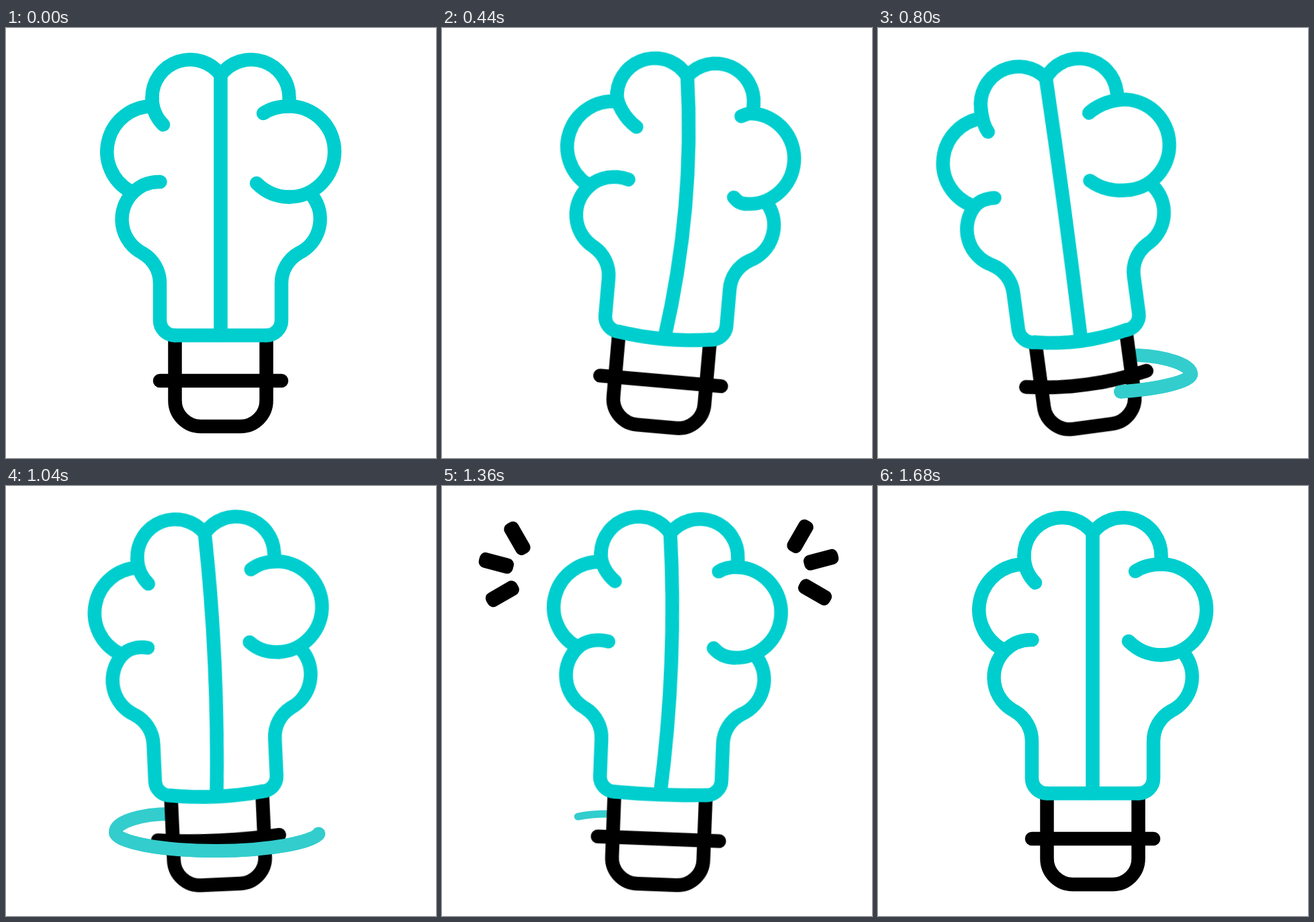
These frames come from a looping animation (640x640 px, 2.16 s). An HTML page without scripts:

```html
<!DOCTYPE html>
<html lang="en">
<head>
<meta charset="utf-8">
<title>Swaying idea bulb</title>
<style>
  html, body { margin: 0; width: 100%; height: 100%; overflow: hidden; background: #fff; }
  svg { display: block; width: 100vw; height: 100vh; }
  path { fill: none; stroke-linecap: round; stroke-linejoin: round; }
  .bulb { stroke: #00cece; stroke-width: 20.5; }
  .base { stroke: #000; stroke-width: 20.5; }

  /* Everything that sways shares one clock and one easing. */
  .sway, .sway path { animation: 2160ms cubic-bezier(.333, 0, .667, 1) infinite; }
  .sway { animation-name: sway; transform-origin: 319.5px 593px; }
  .sway .middle { animation-name: middle; }
  .sway .floor { animation-name: floor; }
  .sway .bar { animation-name: bar; }
  .sway .curl-a { animation-name: curl-a; }
  .sway .curl-b { animation-name: curl-b; }
  .sway .curl-c { animation-name: curl-c; }
  .sway .curl-d { animation-name: curl-d; }

  @keyframes sway {
    0%, 77.78%, 100% { transform: rotate(0deg); }
    20.37% { transform: rotate(5deg); }
    38.89% { transform: rotate(-8deg); }
    57.41% { transform: rotate(2.72deg); }
  }
  @keyframes middle {
    0%, 77.78%, 100% { d: path("M319.5 70Q319.5 262 319.5 457"); }
    20.37% { d: path("M319.5 70Q347.5 262 319.5 462"); }
    38.89% { d: path("M319.5 70Q321.5 262 319.5 464"); }
    57.41% { d: path("M319.5 70Q341.5 262 319.5 459"); }
  }
  @keyframes floor {
    0%, 77.78%, 100% { d: path("M251.5 457.5Q319.5 457.5 387.5 457.5"); }
    20.37% { d: path("M251.5 457.5Q319.5 467.5 387.5 457.5"); }
    38.89% { d: path("M251.5 457.5Q319.5 472 387.5 457.5"); }
    57.41% { d: path("M251.5 457.5Q319.5 462 387.5 457.5"); }
  }
  @keyframes bar {
    0%, 20.37%, 57.41%, 77.78%, 100% { d: path("M229 525Q319.5 525 410 525"); }
    38.89% { d: path("M229 521.5Q319.5 539 410 521.5"); }
  }
  @keyframes curl-a {
    0%, 77.78%, 100% { d: path("M217.5 104C217.5 119 223.5 133.4 234 144"); }
    20.37% { d: path("M217.5 104C217.5 119 232 140 250.7 151.6"); }
    38.89% { d: path("M217.5 104C217.5 116 218 128 222.8 137.4"); }
    57.41% { d: path("M217.5 104C217.5 119 228 135 241.5 144.6"); }
  }
  @keyframes curl-b {
    0%, 77.78%, 100% { d: path("M189 245C199.6 234.4 214 228.5 229.5 229"); }
    20.37% { d: path("M189 245C201 232 224 224 245.7 230.6"); }
    38.89% { d: path("M189 245C197 238 207 235.5 219.4 236.7"); }
    57.41% { d: path("M189 245C199.6 234.4 218 231 234.8 235.8"); }
  }
  @keyframes curl-c {
    0%, 77.78%, 100% { d: path("M421.5 116.5C408 116.5 394.2 119.4 383 127"); }
    20.37% { d: path("M421.5 116.5C415 116.5 411 118.5 404.7 122.1"); }
    38.89% { d: path("M421.5 116.5C406 116.5 388 121 375.5 130"); }
    57.41% { d: path("M421.5 116.5C412 116.5 404 118 396.3 123.4"); }
  }
  @keyframes curl-d {
    0%, 77.78%, 100% { d: path("M421.5 251.5C403.2 251.5 386 244 373 231"); }
    20.37% { d: path("M421.5 251.5C414 251.5 410 249 404.2 243.4"); }
    38.89% { d: path("M421.5 251.5C399 251.5 378 244 363.1 229.6"); }
    57.41% { d: path("M421.5 251.5C411 251.5 402 248 394.5 240"); }
  }

  .ring {
    d: path("M386 487C432 489 466 502 466 515S398 543 314 543S163 530 163 515S200 488 246 488");
    stroke: #33cdcd;
    stroke-width: 20;
    animation: orbit 2160ms linear infinite;
  }
  @keyframes orbit {
    0%, 29.62% { stroke-dasharray: 0 300; stroke-dashoffset: 0; opacity: 0; }
    29.63% { stroke-dasharray: 0 300; stroke-dashoffset: 0; opacity: 1; }
    44.44% { stroke-dasharray: 80 300; stroke-dashoffset: 0; }
    48.15% { stroke-dasharray: 81.8 300; stroke-dashoffset: -18.2; }
    55.56% { stroke-width: 20; }
    62.96% { stroke-width: 11; }
    64.81% { stroke-dasharray: 0 300; stroke-dashoffset: -100; stroke-width: 10; opacity: 1; }
    64.82%, 100% { stroke-dasharray: 0 300; stroke-dashoffset: -100; opacity: 0; }
  }

  .rays rect {
    y: -11.5px;
    height: 23px;
    rx: 9px;
    animation: ray 2160ms linear infinite;
  }
  @keyframes ray {
    0%, 55.56% { x: 0px; width: 0px; }
    62.96% { x: 0px; width: 52px; }
    65.74% { x: 0px; width: 67px; }
    75.93%, 100% { x: 67px; width: 0px; }
  }
</style>
</head>
<body>
<svg viewBox="0 0 640 640">
  <clipPath id="front"><rect y="515" width="640" height="125"/></clipPath>

  <path class="ring" pathLength="100"/>
  <g class="sway base">
    <path d="M251.5 462V554A38.5 38.5 0 0 0 290 593H349A38.5 38.5 0 0 0 387.5 554V462"/>
    <path class="bar"/>
  </g>
  <g clip-path="url(#front)"><path class="ring" pathLength="100"/></g>

  <g class="sway bulb">
    <!-- left half -->
    <path d="M319.5 70A56.5 56.5 0 0 0 217.5 104"/>
    <path d="M217.5 116.5A67.5 67.5 0 0 0 185 243"/>
    <path d="M189 245A56.5 56.5 0 0 0 203 335A51.5 51.5 0 0 1 229 380V435A22.5 22.5 0 0 0 251.5 457.5"/>
    <!-- right half -->
    <path d="M319.5 70A56.5 56.5 0 0 1 421.5 104V114"/>
    <path d="M421.5 116.5A67.5 67.5 0 0 1 421.5 251.5"/>
    <path d="M456 250A56.5 56.5 0 0 1 436 335A51.5 51.5 0 0 0 410 380V435A22.5 22.5 0 0 1 387.5 457.5"/>
    <path class="middle"/>
    <path class="floor"/>
    <path class="curl-a"/>
    <path class="curl-b"/>
    <path class="curl-c"/>
    <path class="curl-d"/>
  </g>

  <g class="rays">
    <g transform="translate(125 100.5) rotate(240)"><rect/></g>
    <g transform="translate(106 121.5) rotate(195)"><rect/></g>
    <g transform="translate(112.5 147.5) rotate(150)"><rect/></g>
    <g transform="translate(520 97.5) rotate(-60)"><rect/></g>
    <g transform="translate(539 116.5) rotate(-15)"><rect/></g>
    <g transform="translate(532.5 145) rotate(30)"><rect/></g>
  </g>
</svg>
</body>
</html>
```
